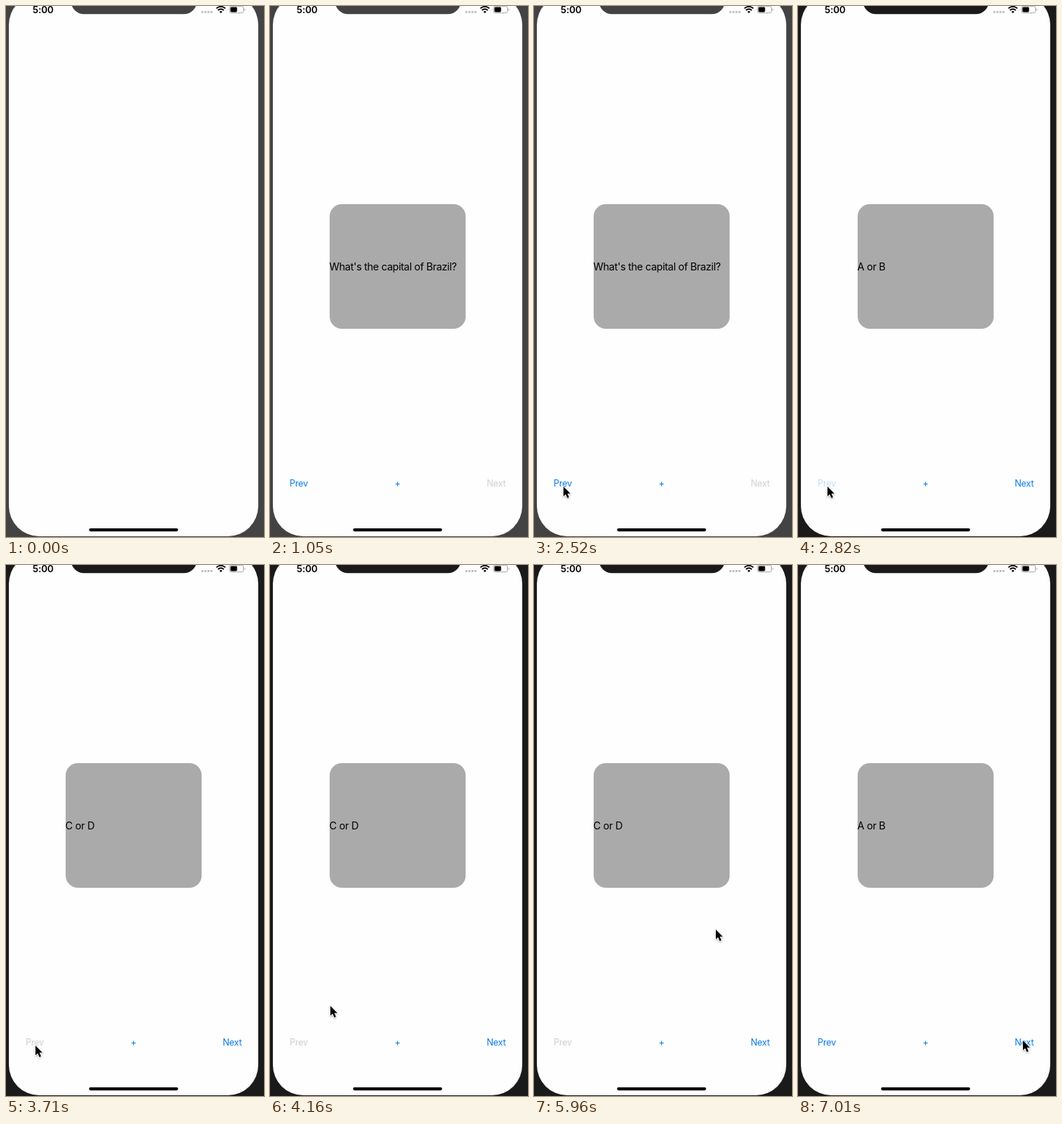
Write an HTML page that moves like this. It is 359 px wide and 737 px high and loops after 8 s.

```html
<!DOCTYPE html>
<html lang="en">
<head>
<meta charset="utf-8">
<title>Flash cards</title>
<style>
html, body { margin: 0; width: 100%; height: 100%; overflow: hidden; background: #434343; }
svg { display: block; width: 359px; height: 737px; font-family: Inter, Roboto, sans-serif; }
.label { font-size: 14.25px; letter-spacing: -.36px; }
.button { font-size: 12.5px; letter-spacing: -.25px; fill: #0a7aea; }
#cursor { filter: drop-shadow(0 1px 1px rgba(0, 0, 0, .3)); }
</style>
</head>
<body>
<svg viewBox="0 0 359 737">
  <rect id="bezel" width="359" height="737"/>
  <rect x="4" y="-16" width="347" height="752" rx="42" fill="#fefefe"/>
  <rect id="notch" x="90.5" y="-40" width="175" height="51.3" rx="18"/>

  <text x="37" y="10" font-size="13.2" font-weight="600" letter-spacing="-.15">5:00</text>
  <path d="M271.8 8.4h16" stroke="#bdbdbd" stroke-width="2.6" stroke-dasharray="2.8 1.45"/>
  <g fill="none" stroke="#000" stroke-width="1.9">
    <path d="M292.8 3.4a8.8 8.8 0 0 1 12.4 0M295 6a5.6 5.6 0 0 1 8 0"/>
  </g>
  <path d="M299 10l-2-2.1a3 3 0 0 1 4 0z"/>
  <rect x="310.9" y=".3" width="19.6" height="9.4" rx="2.6" fill="none" stroke="#a0a0a0" stroke-width=".9"/>
  <rect x="312.3" y="1.6" width="9.2" height="6.8" rx="1.4"/>
  <path d="M331.7 3.4a1.7 1.7 0 0 1 0 3.2z" fill="#a0a0a0"/>
  <rect x="115.5" y="725" width="124" height="4.2" rx="2.1"/>

  <g id="deck">
    <rect x="83" y="275" width="189.3" height="173" rx="17" fill="#aaa"/>
    <text id="card" class="label" x="82.6" y="367"></text>
    <text id="prev" class="button" x="27.2" y="667">Prev</text>
    <text class="button" x="177.5" y="667" text-anchor="middle">+</text>
    <text id="next" class="button" x="301.4" y="667">Next</text>
  </g>
  <path id="cursor" d="M0 0V13.6L3.1 10.7 5.5 16 7.8 15 5.5 9.8H9.7Z" stroke="#fff" stroke-width="1.6" paint-order="stroke" stroke-linejoin="round"/>
</svg>
<script>
const LOOP = 8000, FIRST = 1050, PREV1 = 2820, PREV2 = 3710, NEXT = 6410;
const BLUE = "#0a7aea", OFF = "#d0d0d0";
const $ = id => document.getElementById(id);

// Pointer positions, each held until the next: time, x, y
const path = [
  [1790, 198, 615], [1940, 150, 628], [2090, 100, 643], [2240, 65, 655],
  [2370, 46, 664], [2520, 41, 667], [4010, 48, 658], [4160, 84, 612],
  [4310, 222, 478], [4460, 310, 400], [4610, 208, 398], [5510, 210, 402],
  [5660, 213, 408], [5960, 253, 506], [6110, 318, 659], [6560, 313, 660]
];

// A pressed button brightens back in two steps
function press(t, start) {
  const dt = t - start;
  return dt < 0 || dt >= 290 ? 1 : dt < 150 ? .25 : .6;
}

function paintButton(id, enabled, opacity) {
  $(id).style.fill = enabled ? BLUE : OFF;
  $(id).style.opacity = opacity;
}

function draw(t) {
  const bezel = t < PREV1 ? "#434343" : "#1a1a1a";
  $("bezel").style.fill = $("notch").style.fill = document.body.style.background = bezel;

  $("deck").style.display = t < FIRST ? "none" : "";
  $("card").textContent = t < PREV1 ? "What's the capital of Brazil?"
    : t < PREV2 || t >= NEXT ? "A or B" : "C or D";
  paintButton("prev", t < PREV2 || t >= NEXT, press(t, PREV1));
  paintButton("next", t >= PREV1, press(t, NEXT));

  const spot = path.filter(p => p[0] <= t).pop();
  $("cursor").style.display = spot ? "" : "none";
  if (spot) $("cursor").setAttribute("transform", `translate(${spot[1]} ${spot[2]})`);
}

const start = performance.now();
function tick() {
  draw((performance.now() - start) % LOOP);
  requestAnimationFrame(tick);
}
tick();
</script>
</body>
</html>
```
